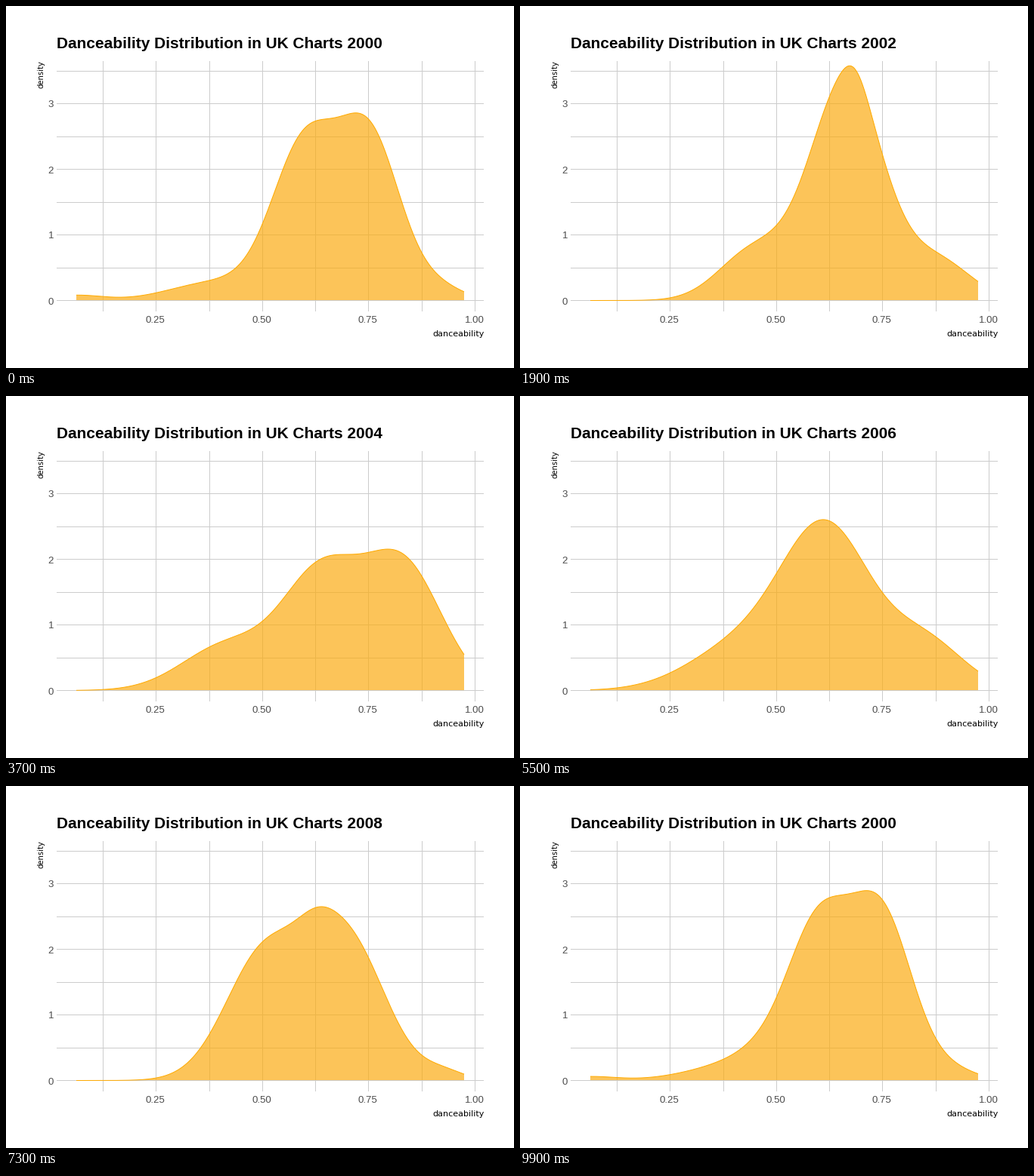
A matplotlib script for the animation above (10 s loop, 672x480 px).

```python
import numpy as np
import matplotlib.pyplot as plt
from matplotlib.animation import FuncAnimation

WIDTH, HEIGHT, DPI = 672, 480, 100
PX = 72 / DPI  # points per pixel
BASE = 390.5
LEFT, RIGHT = 93, 606
UNIT = 27  # pixels per horizontal unit of the bumps

# Each density is a sum of Gaussian bumps: (pixel height, centre, width)
bumps = {
    2000: [(204, 11.2, 1.6), (210, 14.4, 1.5), (24, 6.8, 2.2), (16, 17.8, 1.2), (7, 0, 1.3)],
    2002: [(292, 12.55, 1.8), (20, 13, 0.6), (65, 8, 1.7), (50, 17.1, 1.6)],
    2004: [(165, 16, 1.9), (150, 12, 1.9), (60, 7.4, 2.2)],
    2006: [(206, 11.6, 2.15), (64, 16.4, 1.9), (60, 7.5, 2.6)],
    2008: [(165, 9.2, 1.9), (188, 13.2, 1.9), (22, 11.7, 0.9), (11, 18, 1)],
    2009: [(228, 11.9, 1.95), (110, 15.4, 1.7), (54, 5.55, 1.35), (16, 13.2, 0.9)],
    2010: [(225, 14, 1.5), (190, 11.2, 1.4), (78, 8.5, 1.5)],
}
xs = np.linspace(LEFT, RIGHT, 514)
units = (xs - LEFT) / UNIT


def density(parts):
    return sum(h * np.exp(-((units - c) / w) ** 2 / 2) for h, c, w in parts)


# Years without bumps of their own lie halfway between their neighbours
curves = {year: density(parts) for year, parts in bumps.items()}
fade_in = np.clip(units / 3.5, 0, 1)
for year in range(2001, 2009, 2):
    curves[year] = fade_in * (curves[year - 1] + curves[year + 1]) / 2

FIRST, COUNT = 2000, 11


def state_at(frame):
    """Return the curve and the title year for a frame."""
    curve, shown = curves[FIRST], FIRST
    for k in range(COUNT):
        start, steps = (5 + 10 * k, 5) if k < 2 else (7 + 9 * k, 4)
        if frame < start:
            break
        year, target = FIRST + k, FIRST + (k + 1) % COUNT
        p = min((frame - start + 1) / steps, 1)
        curve = (1 - p) * curves[year] + p * curves[target]
        shown = target if p >= 0.5 else year
    return curve, shown


fig = plt.figure(figsize=(WIDTH / DPI, HEIGHT / DPI), dpi=DPI, facecolor="white")
ax = fig.add_axes([0, 0, 1, 1])
ax.set_xlim(0, WIDTH)
ax.set_ylim(HEIGHT, 0)
ax.axis("off")

# Lines sit on pixel centres, unsnapped, so each fills exactly one pixel
grid_x = np.floor(128.45 + 70.29 * np.arange(8)) + 0.5
grid_y = np.floor(390.48 - 43.45 * np.arange(8)) + 0.5
grid_style = dict(colors="#CCCCCC", linewidths=PX, snap=False, zorder=1)
ax.vlines(grid_x, 73, 405, **grid_style)
ax.hlines(grid_y, 67, 632, **grid_style)


def label(x, y, text, size, color="black", font="Liberation Sans", **kw):
    return ax.text(x, y, text, fontsize=size * PX, color=color,
                   family=font, va="baseline", **kw)


for i, x in enumerate(grid_x[1::2], 1):
    label(x - 1, 420, f"{i / 4:.2f}", 13.3, "#4D4D4D", ha="center")
for i, y in enumerate(grid_y[::2]):
    label(63, y + 5, str(i), 13.3, "#4D4D4D", ha="right")
label(632.5, 438, "danceability", 11.1, font="DejaVu Sans", ha="right")
label(49.5, 72.5, "density", 10, font="DejaVu Sans", ha="right",
      rotation=90, rotation_mode="anchor")
title = label(67, 56.5, "", 20.86, weight="bold")

area, = ax.fill([LEFT, RIGHT, RIGHT], [BASE] * 3, facecolor="#FBAC12",
                edgecolor="none", alpha=0.7, snap=False, zorder=2)
outline, = ax.plot(xs, np.full_like(xs, BASE), color="#FFAA00", lw=PX,
                   snap=False, solid_capstyle="butt", zorder=3)


def update(frame):
    curve, year = state_at(frame)
    ys = BASE - curve
    floor = BASE - 0.5
    top = np.column_stack([xs, np.minimum(ys, floor)])
    area.set_xy(np.vstack([[LEFT, floor], top, [RIGHT, floor]]))
    outline.set_ydata(ys)
    title.set_text(f"Danceability Distribution in UK Charts {year}")
    return area, outline, title


anim = FuncAnimation(fig, update, frames=100, interval=100,
                     repeat=True, repeat_delay=0)
plt.show()
```
